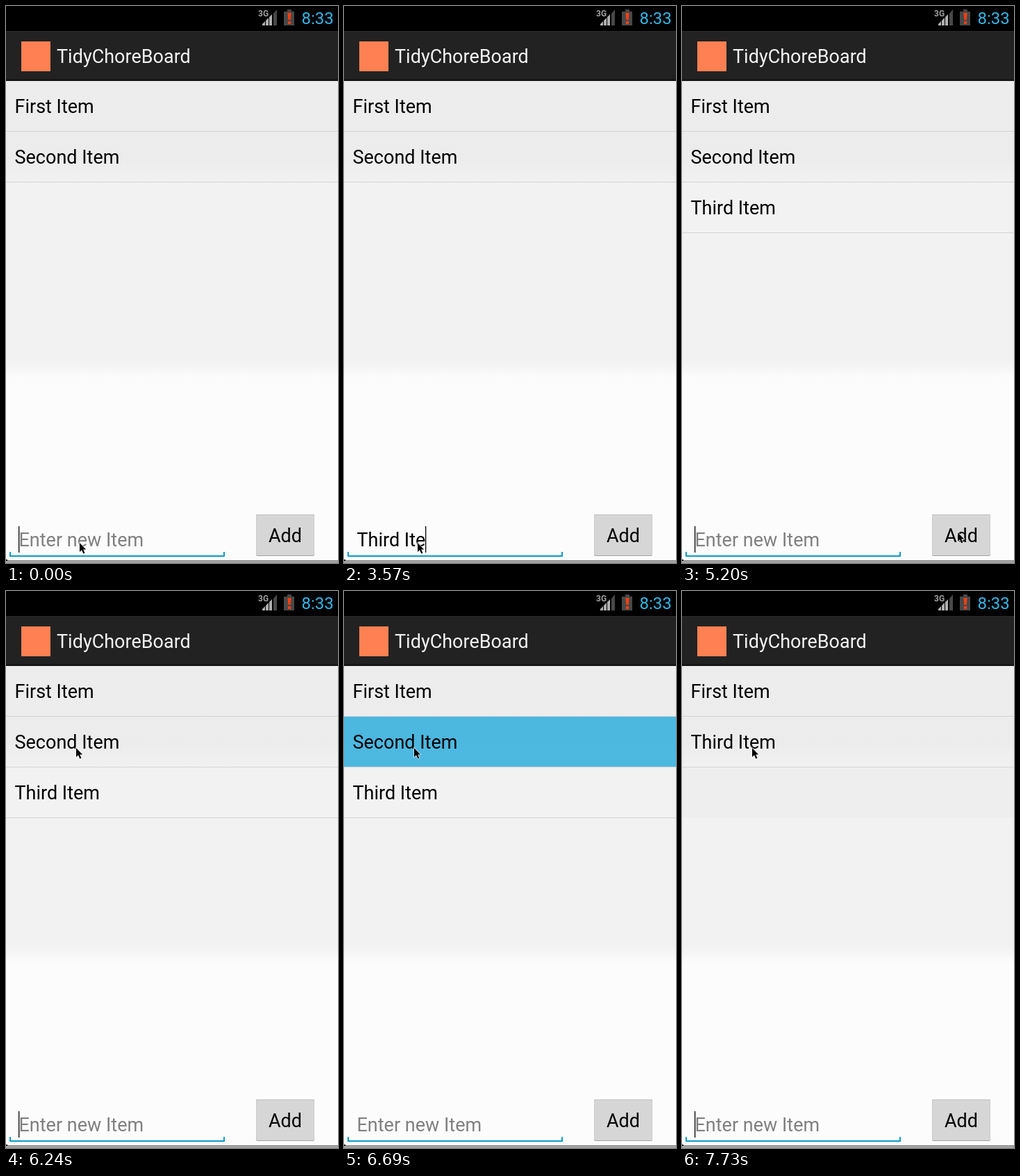
An HTML page that plays this animation: 478x802 px, repeating every 8000 ms.

```html
<!DOCTYPE html>
<html lang="en">
<head>
<meta charset="utf-8">
<title>Todo list</title>
<style>
  html, body { margin: 0; width: 100%; height: 100%; overflow: hidden; background: #fcfcfc; }
  svg { display: block; width: 478px; height: 802px; }
  text { font: 27px Roboto, sans-serif; white-space: pre; }
</style>
</head>
<body>
<svg viewBox="0 0 478 802">
  <defs>
    <linearGradient id="page" gradientUnits="userSpaceOnUse" x1="0" y1="108" x2="0" y2="798">
      <stop offset="0" stop-color="#ededed"/>
      <stop offset=".16" stop-color="#ececec"/>
      <stop offset=".22" stop-color="#f2f2f2"/>
      <stop offset=".585" stop-color="#f2f2f2"/>
      <stop offset=".62" stop-color="#fcfcfc"/>
    </linearGradient>
  </defs>
  <rect y="108" width="478" height="690" fill="url(#page)"/>

  <!-- Status bar -->
  <rect width="478" height="36"/>
  <text x="363" y="15" style="font-size:12px;font-weight:700" fill="#a0a0a0">3G</text>
  <path d="M369 28v-2l4-4v6zM374 28v-7l4-4v11zM379 28V16l4-4v16z" fill="#b0b0b0"/>
  <path d="M385 28V11l5-6v23z" fill="#484848"/>
  <path d="M400 8h5V5h6v3h4v20h-15z" fill="#484848"/>
  <path d="M405.500 10h5l-1 10h-3zM406 22h4v4h-4z" fill="#ff3d10"/>
  <text x="425.500" y="26" style="font-size:24px" fill="#33b5e5">8:33</text>

  <!-- Action bar -->
  <rect y="36" width="478" height="72" fill="#222"/>
  <rect y="36" width="478" height="1" fill="#2c2c2c"/>
  <rect y="105" width="478" height="3" fill="#171717"/>
  <rect x="22" y="51" width="42" height="43" fill="#ff8052"/>
  <text x="73" y="82" fill="#f3f3f3">TidyChoreBoard</text>

  <!-- List -->
  <rect id="vacated" y="254" width="478" height="72" fill="#eee"/>
  <rect id="highlight" y="181" width="478" height="72" fill="#2badde"/>
  <g id="list"></g>

  <!-- Input -->
  <path d="M6 786v6h308v-6" fill="none" stroke="#0c9ac6" stroke-width="2"/>
  <text id="entry" x="18.500" y="778"></text>
  <rect id="caret" y="749" width="1.300" height="38"/>

  <!-- Button -->
  <rect id="halo" x="355" y="726" width="95" height="72" rx="5" fill="#a8def1"/>
  <rect x="360" y="732" width="84" height="60" rx="2" fill="#a4a4a4"/>
  <rect x="360" y="732" width="84" height="59" rx="2" fill="#c2c2c2"/>
  <rect id="face" x="360.500" y="733" width="83" height="58" rx="1.500"/>
  <text x="378" y="772">Add</text>

  <rect y="798" width="478" height="4" fill="#a5a2a5"/>
  <rect y="798" width="478" height="1" fill="#858285"/>
  <rect y="797" width="2" height="2"/>
  <path id="pointer" d="M0 0v13l3-2.800 2.300 5.200 2.200-1-2.300-5h4z"
        stroke="#fff" stroke-width="1.200" paint-order="stroke"/>
</svg>
<script>
  // The screen refreshes in ticks; events below are counted in them.
  const LOOP = 8000, TICK = 148.65, BLINK = 510;
  const PRESS = 31, ADD = 32, SELECT = 44, REMOVE = 47;
  const FIELD = { x: 106, y: 773 }, BUTTON = { x: 397, y: 758 }, ROW = { x: 101, y: 226 };

  const $ = id => document.getElementById(id);
  const set = (id, name, value) => $(id).setAttribute(name, value);
  const show = (id, on) => set(id, 'visibility', on ? 'visible' : 'hidden');
  const clamp = v => Math.min(1, Math.max(0, v));
  const smooth = p => p * p * (3 - 2 * p);
  const mix = (a, b, p) => a + (b - a) * p;

  function typedText(tick) {
    if (tick < 11 || tick >= ADD) return '';
    const count = tick < 14 ? 1 : tick < 21 ? 4 : tick < 23 ? 6 : tick - 15;
    return 'Third Item'.slice(0, count);
  }

  // Solid while typing; otherwise blinks from the latest restart.
  function caretVisible(tick) {
    const ms = tick * TICK;
    if (tick >= 10 && tick < 25) return true;
    const restart = ms < 1500 ? -70 : tick < ADD ? 3585 : 4665;
    return Math.floor((ms - restart) / BLINK) % 2 === 0;
  }

  function pointerAt(tick) {
    if (tick < 34) {
      const p = smooth(clamp((tick - 26) / 4));
      return [mix(FIELD.x, BUTTON.x, p), mix(FIELD.y, BUTTON.y, p)];
    }
    // Sideways motion runs ahead of the climb, bending the path.
    const p = clamp((tick - 34) / 7);
    return [mix(BUTTON.x, ROW.x, clamp(2.9 * p * p)), mix(BUTTON.y, ROW.y, p ** 1.4)];
  }

  function drawRows(tick) {
    const names = ['First', 'Second', 'Third'].filter(name =>
      name === 'Second' ? tick < REMOVE : name === 'First' || tick >= ADD);
    $('list').innerHTML = names.map((name, i) =>
      `<text x="12.500" y="${154 + 73 * i}">${name} Item</text>
       <rect y="${180 + 73 * i}" width="478" height="1" fill="#d3d3d3"/>`).join('');
  }

  function draw(tick) {
    const typed = typedText(tick), pressed = tick === PRESS;
    drawRows(tick);
    show('vacated', tick >= REMOVE);
    show('highlight', tick >= SELECT && tick < REMOVE);
    set('highlight', 'opacity', clamp(mix(0.65, 1, (tick - SELECT) / 2)));

    $('entry').textContent = typed || 'Enter new Item';
    set('entry', 'fill', typed ? '#000' : '#808080');
    set('caret', 'x', 18 + Math.round(typed ? $('entry').getComputedTextLength() - 0.3 : 0));
    show('caret', caretVisible(tick));

    show('halo', pressed);
    set('face', 'fill', pressed ? '#45bbe9' : '#d6d6d6');
    set('pointer', 'transform', `translate(${pointerAt(tick).map(Math.round)})`);
  }

  const begin = performance.now();
  let shown;
  function refresh() {
    const tick = Math.floor((performance.now() - begin) % LOOP / TICK);
    if (tick !== shown) draw(shown = tick);
    requestAnimationFrame(refresh);
  }
  refresh();
</script>
</body>
</html>
```
